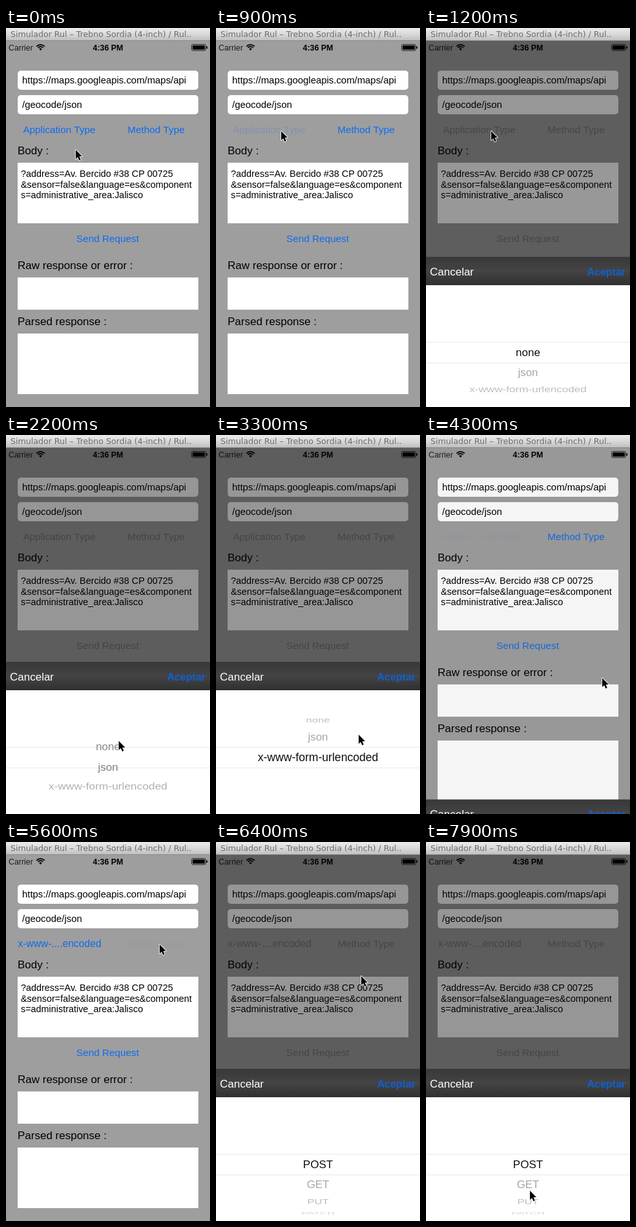
Write an HTML page with a canvas that moves like this. It is 316 px wide and 588 px high and loops after 8000 ms.

```html
<!DOCTYPE html>
<html lang="es">
<head>
<meta charset="utf-8">
<style>
html, body { margin: 0; width: 100%; height: 100%; overflow: hidden; background: #9e9e9e; }
canvas { display: block; width: 316px; height: 588px; }
</style>
</head>
<body>
<canvas id="stage" width="316" height="588"></canvas>
<script>
const ctx = document.getElementById('stage').getContext('2d');
const LOOP = 8000, STEP = 100;
const SANS = '"Liberation Sans", Arial, sans-serif';
const TITLE = '"DejaVu Sans", sans-serif';
const BLUE = [12, 108, 242], DIMMED = [116, 116, 118];
const BAR_TOP = 352, SHEET_H = 236, ROW_Y = 500;

// Pointer path: time, x, y
const PATH = [
  [0, 108, 189], [900, 101, 160], [1200, 101, 160], [1800, 172, 473],
  [1900, 172, 487], [2000, 172, 487], [2600, 180, 450], [2800, 180, 450],
  [3300, 221, 465], [3700, 257, 386], [3900, 273, 377], [4900, 273, 377],
  [5300, 238, 159], [6100, 238, 159], [6400, 225, 208], [6600, 204, 396],
  [6700, 203, 413], [6900, 203, 413], [7800, 159, 538], [7900, 161, 541]
];
const TYPES = ['none', 'json', 'x-www-form-urlencoded'];
const METHODS = ['POST', 'GET', 'PUT', 'PATCH'];

const clamp = v => Math.max(0, Math.min(1, v));
const mix = (a, b, p) => a + (b - a) * p;
const ramp = (t, a, b) => clamp((t - a) / (b - a));
const smooth = p => p * p * (3 - 2 * p);
const slide = (t, start) => 1 - Math.pow(1 - ramp(t, start, start + 350), 3);
const rgb = c => `rgb(${c.map(Math.round).join(',')})`;

function text(str, x, y, size, color = '#000', align = 'left', weight = '', family = SANS) {
  ctx.font = `${weight} ${size}px ${family}`;
  ctx.textAlign = align;
  ctx.fillStyle = color;
  ctx.fillText(str, x, y);
}

function rect(x, y, w, h, color) {
  ctx.fillStyle = color;
  ctx.fillRect(x, y, w, h);
}

function gradient(y, h, ...stops) {
  const g = ctx.createLinearGradient(0, y, 0, y + h);
  stops.forEach((c, i) => g.addColorStop(i / (stops.length - 1), c));
  rect(0, y, 316, h, g);
}

function field(y, str) {
  ctx.beginPath();
  ctx.roundRect(18, y, 280, 30, 5);
  ctx.fillStyle = '#fff';
  ctx.fill();
  ctx.strokeStyle = 'rgba(0,0,0,.12)';
  ctx.lineWidth = 0.6;
  ctx.stroke();
  text(str, 25, y + 19.5, 14.9);
}

function titleBar() {
  gradient(0, 20, '#ececec', '#d8d8d8', '#bdbdbd');
  rect(0, 19, 316, 1, '#8c8c8c');
  text('Simulador Rul – Trebno Sordia (4-inch) / Rul..', 7, 14, 12.6, '#6c6c6c', 'left', '', TITLE);
}

function statusBar() {
  text('Carrier', 4, 34.5, 12.4, '#1c1c1c');
  text('4:36 PM', 158, 34.5, 12.4, '#000', 'center', 'bold');
  ctx.strokeStyle = ctx.fillStyle = '#000';
  ctx.lineWidth = 1.7;
  for (const r of [8.6, 5.6]) {
    ctx.beginPath();
    ctx.arc(53.5, 34.5, r, -Math.PI * 0.76, -Math.PI * 0.24);
    ctx.stroke();
  }
  ctx.beginPath();
  ctx.moveTo(53.5, 35);
  ctx.arc(53.5, 34.5, 3, -Math.PI * 0.76, -Math.PI * 0.24);
  ctx.fill();
  ctx.lineWidth = 0.8;
  ctx.beginPath();
  ctx.roundRect(287.5, 25.5, 22, 9.5, 2);
  ctx.stroke();
  ctx.beginPath();
  ctx.roundRect(289, 27, 19, 6.5, 1);
  ctx.fill();
  rect(310.5, 28.5, 1.6, 3.5, '#000');
}

function button(str, x, y, tint, alpha = 1, size = 15.3) {
  ctx.globalAlpha = alpha;
  text(str, x, y, size, tint, 'center');
  ctx.globalAlpha = 1;
}

function form(t, shown) {
  const tint = rgb(BLUE.map((v, i) => mix(v, DIMMED[i], shown)));
  const pressA = t >= 900 && t < 1000 ? 0.2 : 1;
  const swapA = t >= 4100 && t < 4400 ? 0.06 : t === 4400 ? 0.5 : 1;
  const pressB = t >= 5600 && t < 6100 ? mix(0.06, 1, ramp(t, 5800, 6100)) : 1;

  rect(0, 20, 316, 568, '#9e9e9e');
  statusBar();
  field(66, 'https://maps.googleapis.com/maps/api');
  field(104, '/geocode/json');
  if (t < 4300) button('Application Type', 82.5, 163, tint, pressA * swapA);
  else button('x-www-....encoded', 83, 163, tint, swapA, 15.6);
  button('Method Type', 232.5, 163, tint, pressB);
  text('Body :', 18, 196, 17);
  rect(18, 209, 280, 94, '#fff');
  ['?address=Av. Bercido #38 CP 00725',
   '&sensor=false&language=es&component',
   's=administrative_area:Jalisco'
  ].forEach((s, i) => text(s, 23, 231 + i * 16.7, 14.4));
  button('Send Request', 157.5, 332, tint);
  text('Raw response or error :', 18, 374, 17);
  rect(18, 387, 280, 50, '#fff');
  text('Parsed response :', 18, 461, 17);
  rect(18, 474, 280, 94, '#fff');
}

// Rows lie on a cylinder of radius 81, 23 degrees apart
function wheel(items, pos) {
  items.forEach((s, i) => {
    const d = i - pos, a = d * 0.401;
    if (Math.abs(a) > 1.45) return;
    const k = Math.abs(d);
    const v = k < 0.6 ? mix(15, 155, k / 0.6) : 155 + (k - 0.6) * 24;
    ctx.save();
    ctx.translate(158, ROW_Y + 81 * Math.sin(a));
    ctx.scale(1 - 0.007 * d * d, Math.cos(a));
    text(s, 0, 6, i === 2 && items === TYPES ? 17.6 : 17, rgb([v, v, v]), 'center');
    ctx.restore();
  });
}

function sheet(shown, items, pos) {
  if (shown <= 0) return;
  rect(0, 20, 316, 568, `rgba(0,0,0,${0.41 * shown})`);
  ctx.save();
  ctx.translate(0, SHEET_H * (1 - shown));
  rect(0, 395, 316, 193, '#fff');
  gradient(BAR_TOP, 44, '#383838', '#444', '#303030');
  text('Cancelar', 6, 380.5, 17, '#fff');
  text('Aceptar', 309, 380.5, 16, '#115fd0', 'right', 'bold');
  rect(0, 484, 316, 1, '#e9e9e9');
  rect(0, 516, 316, 1, '#e9e9e9');
  wheel(items, pos);
  ctx.restore();
}

function pointer(t) {
  let i = PATH.length - 1;
  while (PATH[i][0] > t) i--;
  const a = PATH[i], b = PATH[i + 1] || a;
  const p = a === b ? 0 : ramp(t, a[0], b[0]);
  ctx.save();
  ctx.translate(mix(a[1], b[1], p), mix(a[2], b[2], p));
  ctx.beginPath();
  [[0, 0], [0, 14], [3.1, 11.2], [5.4, 16.3], [7.7, 15.2], [5.5, 10.3], [9.8, 10]]
    .forEach(q => ctx.lineTo(...q));
  ctx.closePath();
  ctx.lineJoin = 'round';
  ctx.lineWidth = 1.8;
  ctx.strokeStyle = '#f4f4f4';
  ctx.stroke();
  ctx.fillStyle = '#000';
  ctx.fill();
  ctx.restore();
}

function draw(t) {
  const first = slide(t, 932) - slide(t, 4110);
  const second = slide(t, 5740);
  form(t, first + second);
  if (t < 5000) sheet(first, TYPES, 2 * smooth(ramp(t, 2000, 2600)));
  else sheet(second, METHODS, 0);
  titleBar();
  pointer(t);
}

const begin = performance.now();
function tick() {
  const t = (performance.now() - begin) % LOOP;
  draw(Math.floor(t / STEP) * STEP);
  requestAnimationFrame(tick);
}
tick();
</script>
</body>
</html>
```
